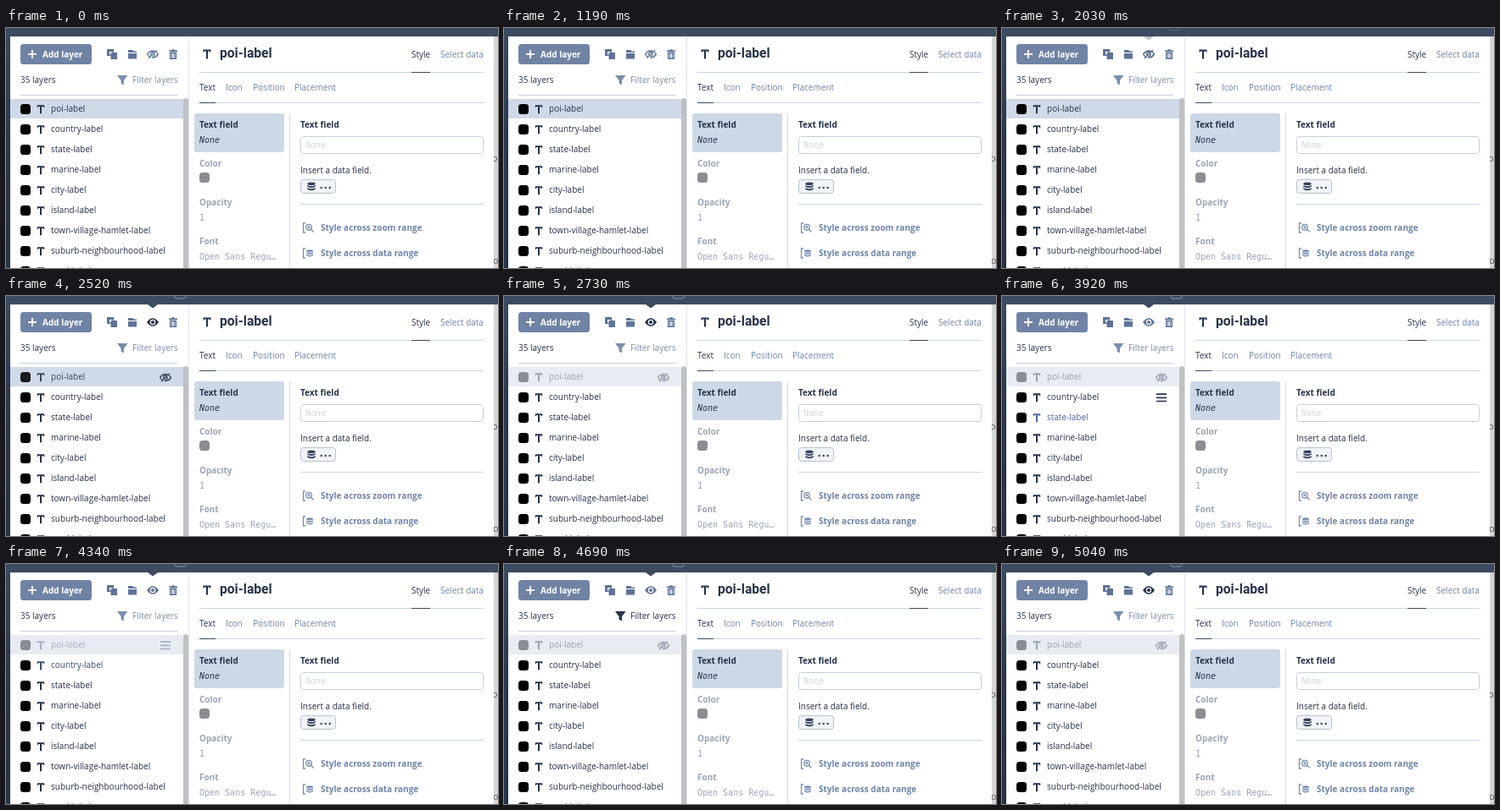
Write an HTML page that moves like this. It is 580 by 284 pixels and loops after 6160 ms.

```html
<!DOCTYPE html>
<html lang="en">
<head>
<meta charset="utf-8">
<title>Layer panel</title>
<style>
html, body { margin: 0; width: 100%; height: 100%; overflow: hidden; background: #fff; }
svg { display: block; width: 580px; height: 284px; }
text { font: 10px "Open Sans", "Noto Sans", sans-serif; fill: #26334a; white-space: pre; }
.b { font-weight: 700; }
.mono { font-family: "DejaVu Sans Mono", monospace; }
.link { fill: #6f83a8; }
.mute { fill: #98a4b7; }
.title { font: 700 15.6px Roboto, sans-serif; }
</style>
</head>
<body>
<svg viewBox="0 0 580 284">
  <defs>
    <linearGradient id="sea" x2="0" y2="1">
      <stop offset="0" stop-color="#3b4960"/>
      <stop offset=".4" stop-color="#2c384c"/>
      <stop offset="1" stop-color="#263248"/>
    </linearGradient>
    <path id="tee" d="M-4.2-5H4.2V-2.3H3.1L2.8-3.3H1V5H-1V-3.3H-2.8L-3.1-2.3H-4.2Z"/>
    <g id="eye">
      <path d="M-7 0Q-3.8-4.7 0-4.7T7 0Q3.800 4.700 0 4.700T-7 0Z" fill="currentColor"/>
      <circle r="3.2" fill="#fff"/>
      <circle r="2.100" fill="currentColor"/>
    </g>
    <g id="eyeOff" fill="none" stroke="currentColor" stroke-width="1.4">
      <path d="M-2.800 3.400Q-5 2.400-6.400 0Q-3.800-4 0-4Q1.600-4 2.700-3.400M4.100-2.500Q5.600-1.400 6.400 0Q3.800 4 0 4Q-.6 4-1.200 3.900"/>
      <path d="M-2 1.200A2.300 2.300 0 0 1 1.200-2M2.200-.6A2.300 2.300 0 0 1-.4 2.200"/>
      <path d="M-5 4.800L5-4.800"/>
    </g>
    <path id="bars" d="M-6-4.200H6M-6 0H6M-6 4.200H6" stroke="currentColor" stroke-width="1.700"/>
    <g id="range" fill="none" stroke="#7b8dae" stroke-width="1.300">
      <path d="M-3-5.500H-5.500V5.500H-3"/>
      <circle cx="1" cy="-.8" r="3.300"/>
      <path d="M3.400 1.600L6.500 5M-.6-.8H2.600M1-2.400V.8"/>
    </g>
    <g id="stack">
      <ellipse cy="-3.200" rx="4.700" ry="1.900"/>
      <path d="M-4.700-1.600Q0 1.300 4.700-1.600V.3Q0 3.200-4.700.3ZM-4.700 1.600Q0 4.500 4.700 1.600V3.300Q0 6.300-4.700 3.300Z"/>
    </g>
  </defs>

  <rect width="580" height="284" fill="#3c4b62"/>
  <rect y="10" width="5" height="274" fill="url(#sea)"/>
  <rect x="575" y="10" width="5" height="274" fill="#d7d6d4"/>
  <text x="573" y="158" style="font-size:11px;fill:#555">o</text>
  <text x="574" y="279" style="font-size:11px;fill:#555">o</text>
  <path d="M5 10H575V284H5Z" fill="#fff"/>
  <path d="M215.500 10V284" stroke="#dde3ec"/>

  <g id="tip">
    <path d="M167 10H179L173 14.500Z" fill="#3c4b62"/>
    <rect id="key" x="199" y="-9" width="13" height="12" rx="2" fill="none" stroke="#8793a6"/>
  </g>

  <rect x="17" y="19" width="84" height="24" rx="3.500" fill="#7083a5"/>
  <path d="M26 31H36M31 26V36" stroke="#fff" stroke-width="2"/>
  <text class="b" x="43" y="34.700" style="fill:#fff">Add layer</text>
  <g fill="#5f7397">
    <path d="M119 25H127V28H122V33H119Z"/>
    <path d="M123.500 29H131V37H123.500Z"/>
    <path d="M119.700 25.700H126.300V32.300H119.700Z" fill="none" stroke="#5f7397" stroke-width="1.400"/>
    <path d="M144 26H149L150.500 27.500H154V29H144ZM144 30H154V36.500H144Z"/>
    <path d="M192 26.500H195L195.500 25.200H198.500L199 26.500H202V28.200H192Z"/>
    <path d="M193.700 29.500H200.300V36.300H193.700Z" fill="none" stroke="#5f7397" stroke-width="1.500"/>
    <path d="M195.700 30V36M198.300 30V36" stroke="#5f7397"/>
  </g>
  <g id="topEye">
    <use id="topOn" href="#eye" x="173" y="31"/>
    <use id="topOff" href="#eyeOff" x="173" y="31"/>
  </g>

  <text x="17" y="64.700">35 layers</text>
  <g id="filter">
    <path d="M131 56H143.500L139 62V67.500L135.500 65.500V62Z" fill="currentColor"/>
    <text x="149" y="64.700" style="fill:currentColor">Filter layers</text>
  </g>
  <path d="M17 79.500H202" stroke="#c5cede"/>

  <rect id="band" x="5" y="84" width="204" height="23" fill="#cfd9e8"/>
  <g id="rows"></g>
  <path d="M209 284V86Q209 83 212 83T215 86V284Z" fill="#bfc0c2"/>

  <use href="#tee" transform="translate(237 31) scale(1.080)" fill="#26334a"/>
  <text class="title" x="252" y="35.300">poi-label</text>
  <text x="478" y="34.700">Style</text>
  <text class="link" x="512" y="34.700">Select data</text>
  <text x="228" y="73.700">Text</text>
  <text class="link" x="259" y="73.700">Icon</text>
  <text class="link" x="291" y="73.700">Position</text>
  <text class="link" x="340" y="73.700">Placement</text>
  <path d="M228 52.500H563M228 88.500H563M347 208.500H563" stroke="#cbd6e6"/>
  <path d="M478 52.500H500M228 88.500H247" stroke="#3b4a62"/>
  <path d="M334.500 101V284" stroke="#d3dbe7"/>

  <rect x="222" y="101" width="106" height="46" rx="3" fill="#cdd8e7"/>
  <text class="b" x="228" y="117.700">Text field</text>
  <text class="mono" x="228" y="135.700" font-style="italic" style="font-style:italic">None</text>
  <text class="b mute" x="228" y="163.700">Color</text>
  <rect x="228" y="171" width="12" height="12" rx="3.500" fill="#8b8d91"/>
  <text class="b mute" x="228" y="209.700">Opacity</text>
  <text class="mono mute" x="228" y="228">1</text>
  <text class="b mute" x="228" y="255.700">Font</text>
  <text class="mono mute" x="228" y="274">Open Sans Regu…</text>

  <text class="b" x="347" y="117.700">Text field</text>
  <rect x="347.500" y="128.500" width="215" height="20" rx="3" fill="#fff" stroke="#c6cfdd"/>
  <text class="mono" x="353" y="142" style="fill:#d3d7dd">None</text>
  <text x="347" y="171.700">Insert a data field.</text>
  <rect x="347.500" y="179.500" width="41" height="16" rx="3" fill="#f0f3f8" stroke="#b7c3d6"/>
  <use href="#stack" x="360" y="187.500" fill="#34425a"/>
  <g fill="#34425a">
    <circle cx="371.700" cy="189" r="1.200"/><circle cx="376.700" cy="189" r="1.200"/><circle cx="381.700" cy="189" r="1.200"/>
  </g>
  <use href="#range" x="356" y="236.500"/>
  <text class="b link" x="371" y="239.700">Style across zoom range</text>
  <path d="M353 261H350.500V272H353" fill="none" stroke="#7b8dae" stroke-width="1.300"/>
  <use href="#stack" transform="translate(358 266.500) scale(.85)" fill="#7b8dae"/>
  <text class="b link" x="371" y="269.700">Style across data range</text>
</svg>
<script>
const LOOP = 6160, STEP = 70;
const DARK = [38, 51, 74], BLUE = [78, 102, 160], SLATE = [98, 117, 153], GREY = [125, 142, 172];
const $ = id => document.getElementById(id);
const names = ['poi', 'country', 'state', 'marine', 'city', 'island',
  'town-village-hamlet', 'suburb-neighbourhood', 'road'];

$('rows').innerHTML = names.map((name, i) => `
  <g class="row" transform="translate(0 ${i * 24})">
    <rect x="17" y="90" width="12" height="12" rx="3.500"/>
    <use href="#tee" x="41" y="96.300" fill="currentColor"/>
    <text x="53" y="98.700" style="fill:currentColor">${name}-label</text>
    <use class="menu" href="#bars" x="188" y="96.300"/>
  </g>`).join('');
const rows = [...document.querySelectorAll('.row')];
rows[0].insertAdjacentHTML('beforeend', '<use id="rowOff" href="#eyeOff" x="188" y="96.500"/>');

const ramp = (t, a, b) => Math.min(1, Math.max(0, (t - a) / (b - a)));
const pulse = (t, a, b, c, d) => ramp(t, a, b) - ramp(t, c, d);
const mix = (p, q, k) => `rgb(${p.map((v, i) => Math.round(v + (q[i] - v) * k))})`;
const show = (el, on) => el.setAttribute('visibility', on ? 'visible' : 'hidden');
const within = (t, a, b) => t >= a && t < b;

// Per row: menu shown from / to, then hover tint in and out
const hovers = [
  [4200, 4550, 4200, 4410, 4550, 4690],
  [3920, 4200, 3920, 3990, 4270, 4410],
  [3710, 3920, 3710, 3780, 3920, 3990]
];

function draw(time) {
  const t = Math.floor(time % LOOP / STEP) * STEP;
  const hidden = t >= 2450;

  $('tip').setAttribute('opacity', ramp(t, 1960, 2170));
  $('key').setAttribute('x', hidden ? 199 : 196);

  const eye = pulse(t, 1960, 2170, 3710, 3780) + ramp(t, 4900, 5040);
  $('topEye').style.color = mix(SLATE, DARK, eye);
  show($('topOn'), hidden);
  show($('topOff'), !hidden);
  $('filter').style.color = mix(GREY, DARK, pulse(t, 4550, 4690, 4690, 4830));

  const fade = t >= 2730 ? 1 : t >= 2520 ? .2 : 0;
  $('band').setAttribute('opacity', 1 - .5 * (t >= 2730));
  rows[0].setAttribute('opacity', 1 - .6 * fade);

  rows.forEach((row, i) => {
    const h = hovers[i];
    row.style.color = mix(DARK, BLUE, h ? pulse(t, ...h.slice(2)) : 0);
    show(row.querySelector('.menu'), h && within(t, h[0], h[1]));
  });
  show($('rowOff'), hidden && !within(t, 4200, 4550));
}

const start = performance.now();
function tick() {
  draw(performance.now() - start);
  requestAnimationFrame(tick);
}
tick();
</script>
</body>
</html>
```
